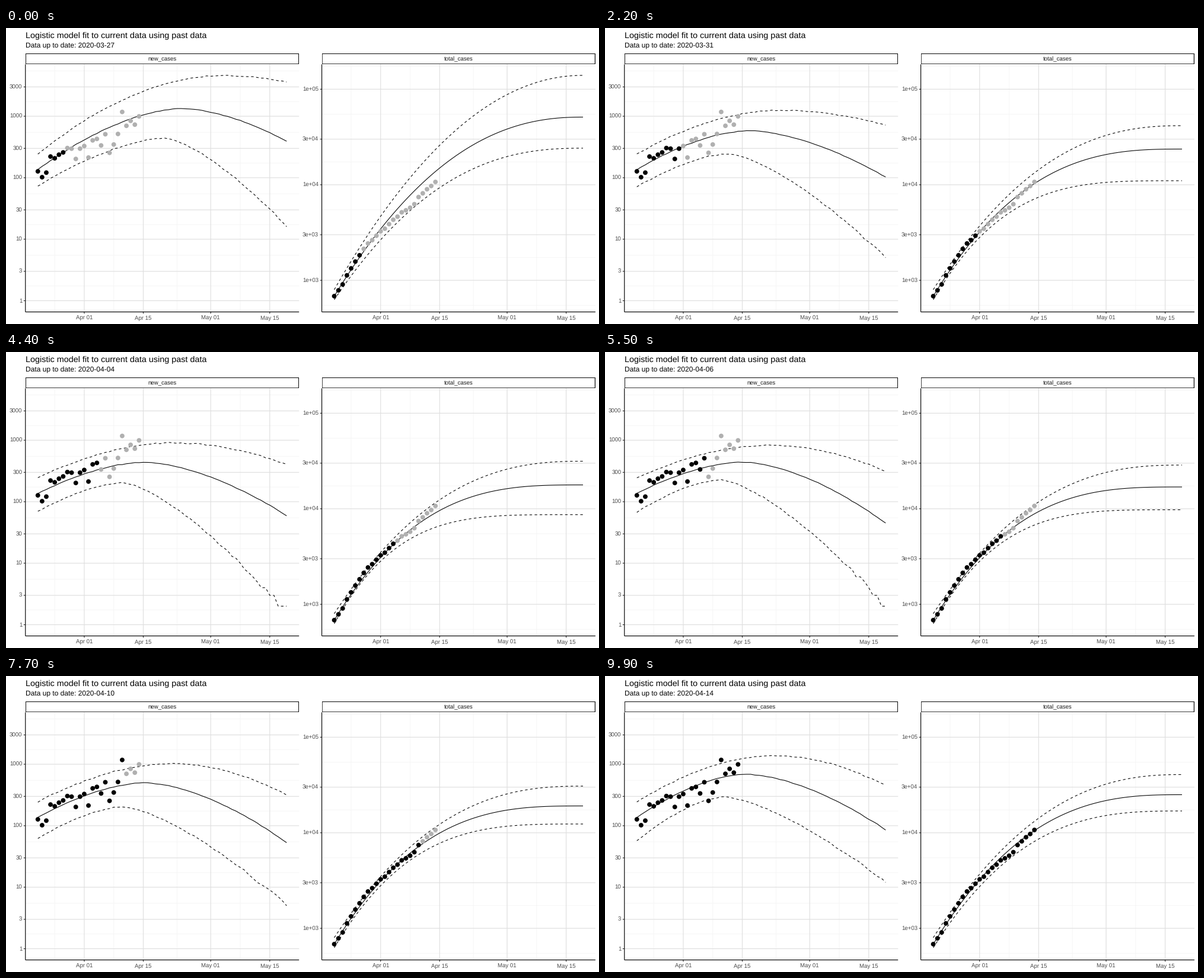
Animation, 1000 px wide and 500 px high, one loop 10000 ms. Source, as a matplotlib script:

```python
import numpy as np
import matplotlib
import matplotlib.pyplot as plt
from matplotlib.animation import FuncAnimation

W, H, DPI = 1000, 500, 100
PX = 72 / DPI  # points per pixel
FRAMES, INTERVAL = 100, 100
matplotlib.rcParams["font.family"] = "Liberation Sans"
matplotlib.rcParams["text.hinting"] = "none"

LEFT, RIGHT, TOP, BOTTOM = 32.76, 494.2, 61.4, 479.6
STRIP_TOP = 42.8
PANEL_DX = 499.8
LAST_DAY = 59  # day 0 is 21 March
DAYS = np.arange(LAST_DAY + 1)
MARGIN = 0.05 / 1.1

# A new fit every 5.5 frames; some changes pass through a halfway blend.
INDEX = np.arange(19)
CHANGES = np.floor(INDEX * 5.5) + (INDEX % 4 == 3)
BLENDED = {1, 5, 9, 12, 13, 17}

CASES = np.array([127, 102, 121, 221, 207, 237, 258, 304, 297, 202, 297, 328, 213,
                  405, 428, 335, 510, 254, 347, 515, 1175, 699, 842, 730, 995])
TOTALS = 683 + np.cumsum(CASES) - CASES[0]

KEY_FITS = [0, 2, 4, 6, 10, 14, 18]


def day_x(day):
    width = RIGHT - LEFT
    return LEFT + width * (MARGIN + np.asarray(day) / (1.1 * LAST_DAY))


def new_y(value):
    return 460.6 - 103.85 * np.log10(value)


def total_y(value):
    return 426.2 - 161.4 * (np.log10(value) - 3)


def key(fit, *values):
    return np.interp(fit, KEY_FITS, values)


def arch(fit, start, peak, end, peak_day, lead, rise, fall, noise, rng):
    """Daily cases: climb to a peak that moves earlier with each fit, then drop."""
    top = peak_day + lead * np.exp(-fit / 3) + 0.15 * fit
    before = np.clip((top - DAYS) / top, 0, 1) ** rise
    after = np.clip((DAYS - top) / (LAST_DAY - top), 0, 1) ** fall
    y = peak + (start - peak) * before + (end - peak) * after
    y = y + rng.normal(0, noise, len(DAYS))
    whole = np.round(10 ** ((460.6 - y) / 103.85))
    return new_y(np.maximum(whole, 1))


def levelling(start, end, reach, power):
    """Total cases: steep growth that flattens out on the last day."""
    drop = start - end
    bend = (reach / drop) ** power
    return end + drop * (1 - DAYS / LAST_DAY) ** bend


def fit_curves(fit):
    rng = np.random.default_rng(fit)
    return np.array([
        arch(fit, 213, key(fit, 80, 109.5, 139, 149.5, 157.5, 148, 134.5),
             key(fit, 91.5, 133, 164, 177, 202, 201, 185), 30, 14, 1.9, 1.9, 0.45, rng),
        arch(fit, 239, key(fit, 136, 150, 173.5, 186.5, 186, 180.5, 166),
             key(fit, 191, 233, 252, 264, 289, 281.5, 260), 23, 11, 1.7, 1.7, 0.25, rng),
        arch(fit, 267 + 0.035 * fit ** 2, key(fit, 186, 188.5, 212.5, 225.5, 216, 221, 204),
             key(fit, 335, 366, 388, 453, 430, 388, 348), 18, 12, 1.6, 1.45, 0.45, rng),
        levelling(442, key(fit, 80, 120.5, 165, 178, 191, 186, 166.5), 1180, 0.6),
        levelling(453, key(fit, 150.5, 174, 204.5, 221, 228, 219.5, 200.5), 690, 1),
        levelling(459, key(fit, 203, 220.5, 258, 283, 266.5, 250, 228), 447, 1.6),
    ])


CURVES = [fit_curves(fit) for fit in INDEX]

fig = plt.figure(figsize=(W / DPI, H / DPI), dpi=DPI, facecolor="white")
ax = fig.add_axes([0, 0, 1, 1])
ax.set_xlim(0, W)
ax.set_ylim(H, 0)
ax.axis("off")


def stroke(xs, ys, color, width, z=1, **kw):
    return ax.plot(xs, ys, color=color, lw=width * PX, zorder=z, snap=False,
                   solid_capstyle="butt", dash_capstyle="butt", **kw)[0]


def label(x, y, text, size, color="#4d4d4d", ha="center"):
    return ax.text(x, y, text, fontsize=size * PX, color=color, ha=ha,
                   va="baseline", zorder=7)


def box(dx, top, bottom, **kw):
    return plt.Rectangle((LEFT + dx, top), RIGHT - LEFT, bottom - top,
                         transform=ax.transData, **kw)


def midpoints(values):
    return (values[1:] + values[:-1]) / 2


def draw_panel(dx, name, ticks, to_y, minor):
    left, right = LEFT + dx, RIGHT + dx
    for y in minor:
        stroke([left, right], [y, y], "#f5f5f5", 0.9, 0)
    for day in (4, 18, 33, 48):
        x = day_x(day) + dx
        stroke([x, x], [TOP, BOTTOM], "#f5f5f5", 0.9, 0)
    for value, text in ticks:
        y = to_y(value)
        stroke([left, right], [y, y], "#dfdfdf", 1.16)
        stroke([left - 3, left], [y, y], "#333333", 1.16, 6)
        label(left - 5.4, y + 3.3, text, 9.6, ha="right")
    for day, text in ((11, "Apr 01"), (25, "Apr 15"), (41, "May 01"), (55, "May 15")):
        x = day_x(day) + dx
        stroke([x, x], [TOP, BOTTOM], "#dfdfdf", 1.16)
        stroke([x, x], [BOTTOM, BOTTOM + 3], "#333333", 1.16, 6)
        label(x, 492.7, text, 9.6)
    stroke([left, left], [TOP, BOTTOM], "black", 1.16, 6)
    stroke([left, right], [BOTTOM, BOTTOM], "black", 1.16, 6)
    # only the inner half of the strip's border shows
    strip = box(dx, STRIP_TOP, TOP, fc="white", ec="black", lw=2.33 * PX,
                zorder=6, snap=False)
    ax.add_patch(strip)
    strip.set_clip_path(box(dx, STRIP_TOP, TOP))
    label((left + right) / 2, 55, name, 9.6, "#1a1a1a")


new_ticks = [1, 3, 10, 30, 100, 300, 1000, 3000]
total_ticks = [(1e3, "1e+03"), (3e3, "3e+03"), (1e4, "1e+04"), (3e4, "3e+04"), (1e5, "1e+05")]
draw_panel(0, "new_cases", [(v, str(v)) for v in new_ticks], new_y,
           midpoints(new_y(new_ticks + [10000])))
draw_panel(PANEL_DX, "total_cases", total_ticks, total_y,
           midpoints(total_y([3e2] + [v for v, _ in total_ticks] + [3e5])))

label(LEFT, 16.8, "Logistic model fit to current data using past data", 14.4, "black", "left")
subtitle = label(LEFT, 34, "", 12, "black", "left")

lines, dots = [], []
for dx, heights in ((0, new_y(CASES)), (PANEL_DX, total_y(TOTALS))):
    for style in ((0, (4, 4)), "-", (0, (4, 4))):
        line = stroke(day_x(DAYS) + dx, DAYS * 0.0, "black", 1.07, 3, ls=style)
        line.set_clip_path(box(dx, TOP, BOTTOM))
        lines.append(line)
    dots.append(ax.scatter(day_x(np.arange(len(CASES))) + dx, heights,
                           s=(7.8 * PX) ** 2, linewidths=0, zorder=4))


def update(frame):
    fit = int(np.searchsorted(CHANGES, frame, side="right")) - 1
    curves = CURVES[fit]
    if frame == CHANGES[fit] and fit in BLENDED:
        curves = (CURVES[fit - 1] + curves) / 2
    for line, y in zip(lines, curves):
        line.set_ydata(y)
    known = 7 + fit
    colors = ["black"] * known + ["#b0b0b0"] * (len(CASES) - known)
    for group in dots:
        group.set_facecolor(colors)
    month, day = (3, 27 + fit) if fit < 5 else (4, fit - 4)
    subtitle.set_text(f"Data up to date: 2020-{month:02d}-{day:02d}")
    return [*lines, *dots, subtitle]


anim = FuncAnimation(fig, update, frames=FRAMES, interval=INTERVAL,
                     repeat=True, repeat_delay=0, blit=False)
plt.show()
```
